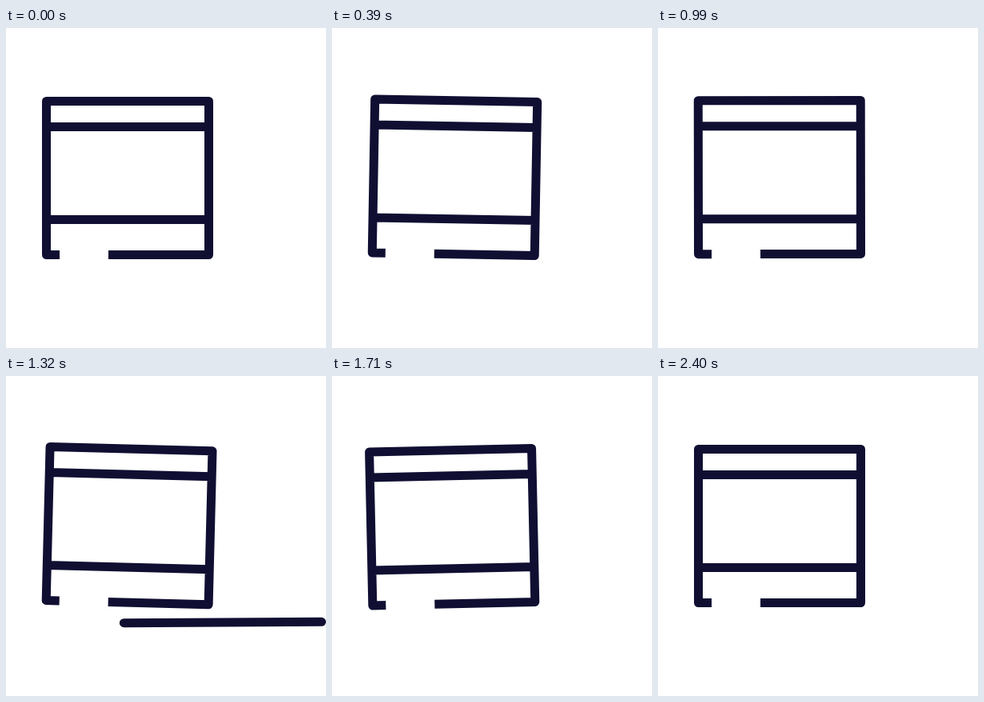
Recreate the animation shown at these times as an HTML page. Size 400 by 400 pixels, loop 2.46 s.

```html
<!DOCTYPE html>
<html lang="en">
<head>
<meta charset="utf-8">
<title>Rolling truck</title>
<style>
  html, body { margin: 0; width: 100%; height: 100%; overflow: hidden; background: #fff; }
  svg { display: block; width: 100%; height: 100%; }
  path { fill: none; stroke: #100f32; stroke-width: 11; stroke-linejoin: round; }
  #road { stroke-linecap: round; }
</style>
</head>
<body>
<svg viewBox="0 0 400 400">
  <path id="body" d="M67 283.5H50.5V91.5H253.5V283.5H128M50.5 123.5H253.5M50.5 239.5H253.5"/>
  <path id="road"/>
</svg>
<script>
const LOOP = 2460, STEP = 30, LAST = 2400;
const ROCK = { period: 1000, end: 2000, up: 1.6, down: 1.3 };
const ROAD = { first: 41, period: 576, passes: 3, sweep: 215, delay: 129 };
// Vertical bounce as [time, offset]
const BOUNCE = [[0, 0], [390, -0.3], [780, 1.1], [990, -1], [1320, 0.3], [1710, 0.6], [2100, 0], [LOOP, 0]];

const body = document.getElementById('body');
const road = document.getElementById('road');

function ease(p) {
  p = Math.min(1, Math.max(0, p));
  return p * p * (3 - 2 * p);
}

function bounce(t) {
  const i = BOUNCE.findIndex(([time]) => time > t);
  const [t0, y0] = BOUNCE[i - 1], [t1, y1] = BOUNCE[i];
  return y0 + (y1 - y0) * ease((t - t0) / (t1 - t0));
}

function tilt(t) {
  if (t >= ROCK.end) return 0;
  const wave = Math.sin(2 * Math.PI * t / ROCK.period);
  return wave * (wave > 0 ? ROCK.up : ROCK.down);
}

const roadPoint = p => `${394.5 - 389.5 * p} ${307.3 + 2.2 * p}`;

function roadPath(t) {
  const pass = Math.floor((t - ROAD.first) / ROAD.period);
  if (pass < 0 || pass >= ROAD.passes) return '';
  const local = t - ROAD.first - pass * ROAD.period;
  const head = ease(local / ROAD.sweep);
  const tail = ease((local - ROAD.delay) / ROAD.sweep);
  return head > tail ? `M${roadPoint(tail)}L${roadPoint(head)}` : '';
}

function draw(now) {
  const t = Math.min(LAST, Math.floor(now % LOOP / STEP) * STEP);
  body.setAttribute('transform', `translate(0 ${bounce(t)}) rotate(${tilt(t)} 180 270)`);
  road.setAttribute('d', roadPath(t));
}

const start = performance.now();
function tick() {
  draw(performance.now() - start);
  requestAnimationFrame(tick);
}
tick();
</script>
</body>
</html>
```
